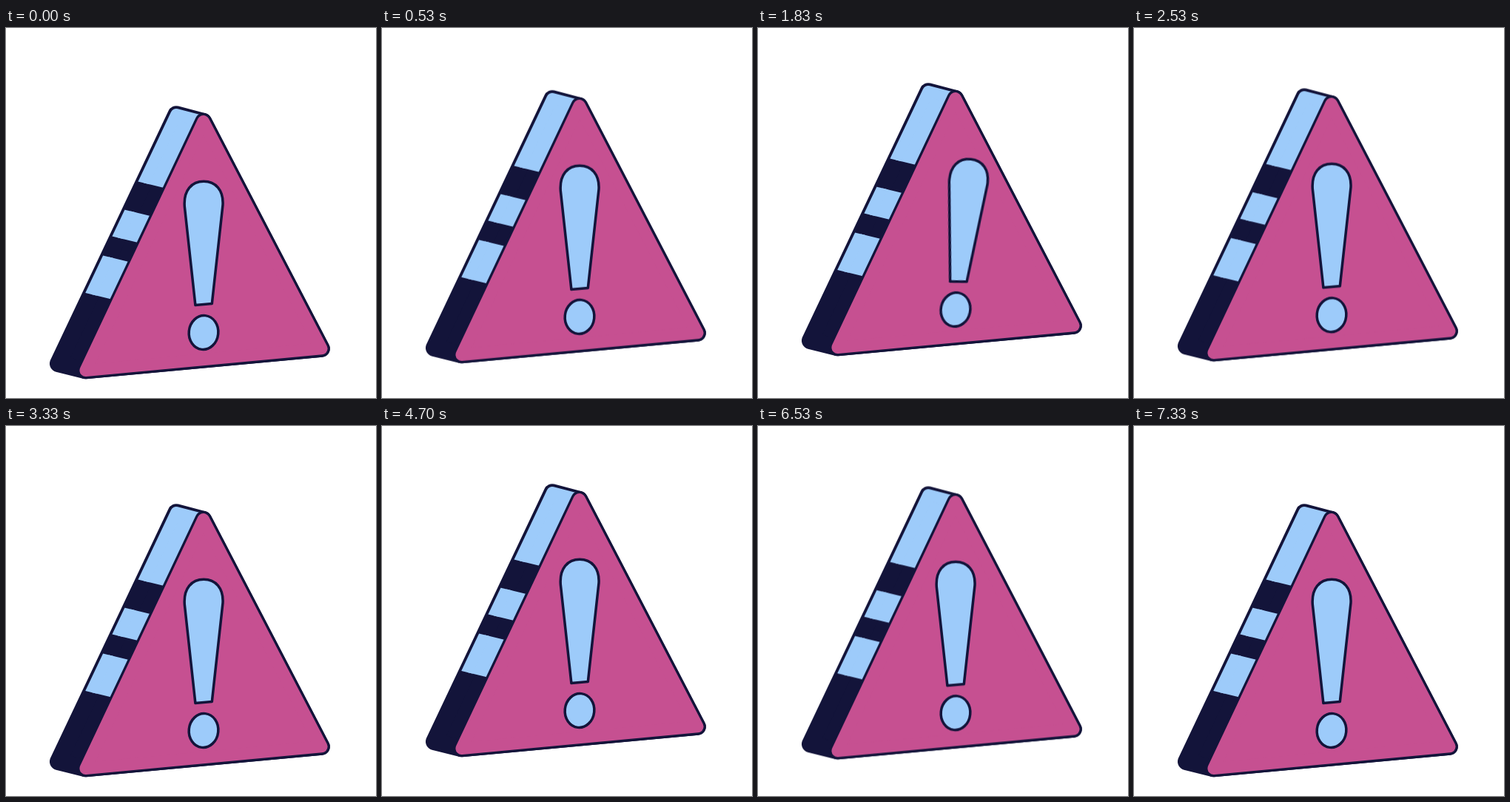
An HTML page for the animation above (8010 ms loop, 500x500 px).

```html
<!DOCTYPE html>
<html lang="en">
<head>
<meta charset="utf-8">
<title>Warning sign</title>
<style>
  html, body { margin: 0; width: 100%; height: 100%; overflow: hidden; background: #fff; }
  svg { display: block; width: 100vw; height: 100vh; }
  .ink { fill: #13143a; stroke: #13143a; stroke-width: 23; stroke-linejoin: round; }
  .face { fill: #c65091; stroke: #c65091; stroke-width: 16.4; stroke-linejoin: round; }
  .side { fill: #9dcbfa; stroke: #9dcbfa; stroke-width: 15.4; stroke-linejoin: round; }
  .mark { fill: #9dcbfa; stroke: #13143a; stroke-width: 3.5; stroke-linejoin: round; }
  #mark { transform-origin: 267px 411.5px; }
</style>
</head>
<body>
<svg viewBox="0 0 500 500">
  <clipPath id="bands"><path id="bandPath"/></clipPath>
  <g id="sign">
    <!-- rounded corners come from thick round-joined strokes -->
    <path class="ink" d="M230 116.7L266.7 126.3L426.3 433.2L107.6 462.8L70.5 453.5Z"/>
    <g clip-path="url(#bands)">
      <path class="side" d="M230 116.7L266.7 126.3L107.6 462.8L70.5 453.5Z"/>
    </g>
    <path class="ink" d="M266.7 126.3L426.3 433.2L107.6 462.8Z"/>
    <path class="face" d="M266.7 126.3L426.3 433.2L107.6 462.8Z"/>
    <g id="mark">
      <path class="mark" d="M255.9 374.5L241.3 241C239.8 219 251.2 207.3 267.2 207.3C283.2 207.3 294 219 293 239L278.3 372.5Z"/>
      <ellipse class="mark" cx="267" cy="411.5" rx="19.8" ry="23" transform="rotate(6 267 411.5)"/>
    </g>
  </g>
</svg>
<script>
  const LOOP = 8010, CYCLE = 4000;
  const $ = id => document.getElementById(id);

  // Light bands on the side, as heights at x = 0 of slanted lines
  const SLOPE = 0.2424;
  const slant = (x, y) => `${x} ${y + SLOPE * x}`;
  $('bandPath').setAttribute('d', [[0, 164.2], [206.8, 246.8], [275.7, 332]]
    .map(([a, b]) => `M${slant(40, a)}L${slant(300, a)}L${slant(300, b)}L${slant(40, b)}Z`)
    .join(''));

  // Steps: [time in ms, value, easing to the next step]
  const GLIDE = 'cubic-bezier(.4,0,.3,1)';
  const SWING = 'cubic-bezier(.333,0,.667,1)';
  function track(id, steps, toTransform) {
    const frames = steps.map(([time, value, easing = 'linear']) =>
      ({ offset: time / CYCLE, transform: toTransform(value), easing }));
    const anim = $(id).animate(frames, { duration: CYCLE, fill: 'both' });
    anim.pause();
    return anim;
  }

  const tracks = [
    track('sign',
      [[0, 0, GLIDE], [1100, -31], [2233, -31, GLIDE], [3333, 0], [CYCLE, 0]],
      y => `translateY(${y}px)`),
    track('mark',
      [[0, 0], [933, 0, SWING], [1333, -6.7, SWING], [1733, 6.7, SWING], [2133, 0], [CYCLE, 0]],
      a => `rotate(${a}deg)`)
  ];

  // The picture steps twice per 100 ms, at 0 and 30
  const snap = t => Math.floor(t / 100) * 100 + (t % 100 >= 30 ? 30 : 0);

  const start = performance.now();
  function draw() {
    const t = (performance.now() - start) % LOOP;
    const time = snap(t) % CYCLE;
    for (const anim of tracks) anim.currentTime = time;
    requestAnimationFrame(draw);
  }
  draw();
</script>
</body>
</html>
```
